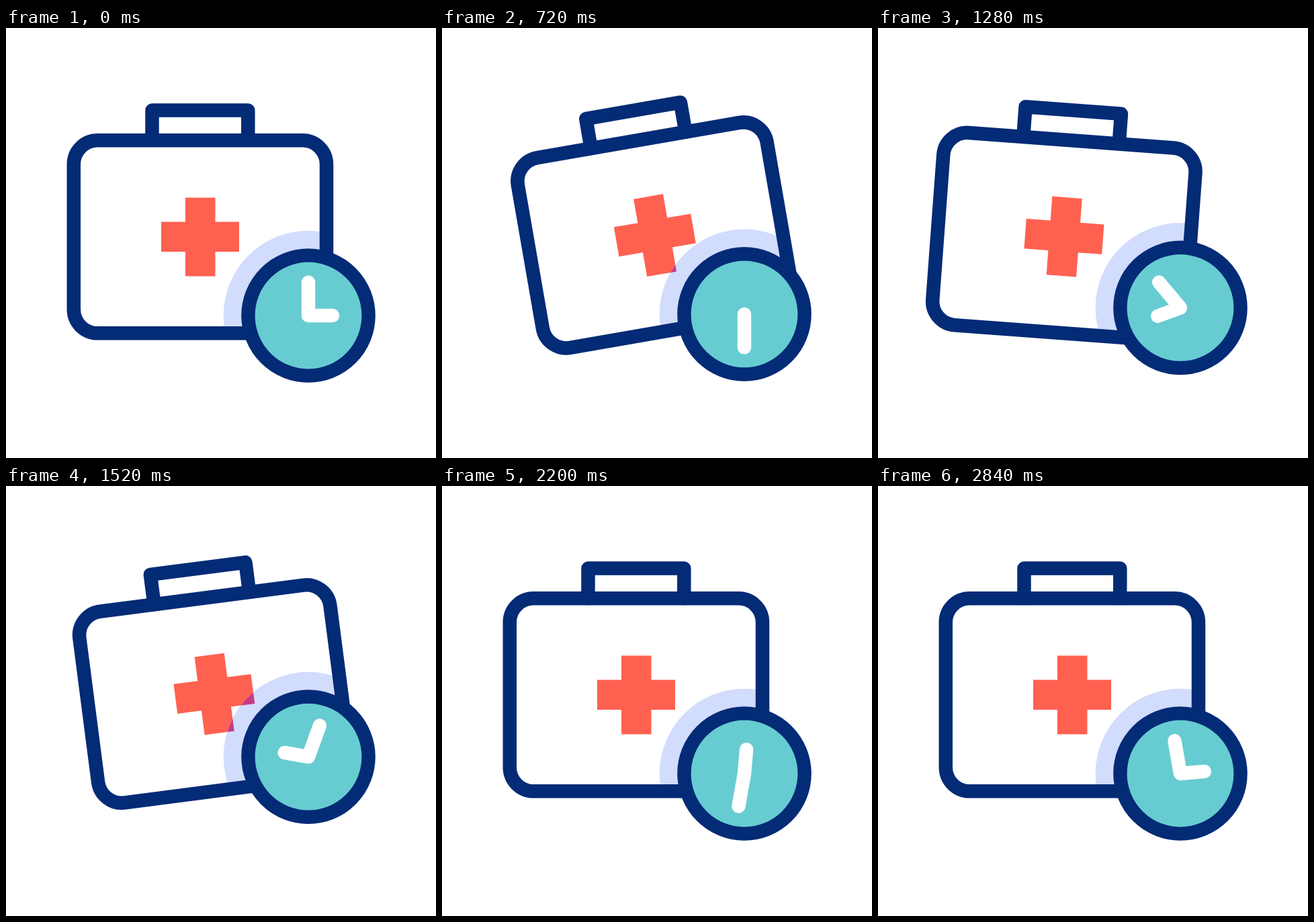
These frames come from a looping animation (640 px wide and 640 px high, 2.88 s). An HTML page with a canvas:

```html
<!DOCTYPE html>
<html lang="en">
<head>
<meta charset="utf-8">
<title>First aid kit and clock</title>
<style>
  html, body { margin: 0; width: 100%; height: 100%; overflow: hidden; background: #fff; }
  canvas { display: block; width: 100vmin; height: 100vmin; }
</style>
</head>
<body>
<canvas id="stage" width="640" height="640"></canvas>
<script>
const ctx = document.getElementById('stage').getContext('2d');
const LOOP = 2880, STEP = 40, TAU = Math.PI * 2;
const NAVY = '#032b76', TEAL = '#67ccd1', RED = '#ff6151', HALO = '#d2dcfd', OVERLAP = '#c43c85';
const PIVOT = { x: 289, y: 148 };
const CLOCK = { x: 450, y: 428 };

// Keys: [time, value, bias]; a bias below 1 makes the move to that key leave sooner.
const SWING = [[200, 0], [690, -10], [1170, 6.3], [1645, -10], [2085, 0]];
const BOB = [[0, 0], [490, -25.8], [975, 25.8], [1480, -25.8, 0.86], [1950, 25.8], [2170, 0]];

function track(keys, t) {
  if (t <= keys[0][0]) return keys[0][1];
  for (let i = 1; i < keys.length; i++) {
    const [t0, v0] = keys[i - 1];
    const [t1, v1, bias = 1] = keys[i];
    if (t < t1) {
      const u = Math.pow((t - t0) / (t1 - t0), bias);
      return v0 + (v1 - v0) * (1 - Math.cos(Math.PI * u)) / 2;
    }
  }
  return keys[keys.length - 1][1];
}

function circlePath(x, y, r) {
  const p = new Path2D();
  p.arc(x, y, r, 0, TAU);
  return p;
}

const body = new Path2D();
body.roundRect(100.8, 167.3, 376.2, 287, 35.5);

const handle = new Path2D();
handle.moveTo(217.5, 167);
handle.lineTo(217.5, 122.5);
handle.lineTo(360.3, 122.5);
handle.lineTo(360.3, 167);

const cross = new Path2D();
cross.rect(267, 252.5, 44.5, 117);
cross.rect(231, 288.5, 36.2, 44.5);
cross.rect(311.3, 288.5, 35.7, 44.5);

function swing(deg) {
  ctx.translate(PIVOT.x, PIVOT.y);
  ctx.rotate(deg * Math.PI / 180);
  ctx.translate(-PIVOT.x, -PIVOT.y);
}

function drawBag(deg, clockY) {
  const halo = circlePath(CLOCK.x, clockY, 126.3);

  ctx.save();
  swing(deg);
  ctx.fillStyle = RED;
  ctx.fill(cross);
  ctx.restore();

  // The halo shows only inside the bag.
  ctx.save();
  swing(deg);
  ctx.clip(body);
  ctx.setTransform(1, 0, 0, 1, 0, 0);
  ctx.fillStyle = HALO;
  ctx.fill(halo);
  ctx.clip(halo);
  swing(deg);
  ctx.fillStyle = OVERLAP;
  ctx.fill(cross);
  ctx.restore();

  ctx.save();
  swing(deg);
  ctx.strokeStyle = NAVY;
  ctx.lineWidth = 20.5;
  ctx.lineJoin = 'round';
  ctx.stroke(handle);
  ctx.stroke(body);
  ctx.restore();
}

function handTip(y, deg, len) {
  const a = deg * Math.PI / 180;
  return [CLOCK.x + Math.sin(a) * len, y - Math.cos(a) * len];
}

function drawClock(y, turn) {
  const face = circlePath(CLOCK.x, y, 89.6);
  ctx.fillStyle = TEAL;
  ctx.fill(face);
  ctx.strokeStyle = NAVY;
  ctx.lineWidth = 20.4;
  ctx.stroke(face);

  ctx.strokeStyle = '#fff';
  ctx.lineCap = ctx.lineJoin = 'round';
  ctx.beginPath();
  ctx.moveTo(...handTip(y, turn * 720, 49.5));
  ctx.lineTo(CLOCK.x, y);
  ctx.lineTo(...handTip(y, 90 + turn * 360, 36));
  ctx.stroke();
}

function draw(t) {
  const y = CLOCK.y + track(BOB, t);
  ctx.fillStyle = '#fff';
  ctx.fillRect(0, 0, 640, 640);
  drawBag(track(SWING, t), y);
  drawClock(y, t / LOOP);
}

function tick() {
  const t = Math.floor((performance.now() + 2) / STEP) * STEP;
  draw(t % LOOP);
  requestAnimationFrame(tick);
}

tick();
</script>
</body>
</html>
```
